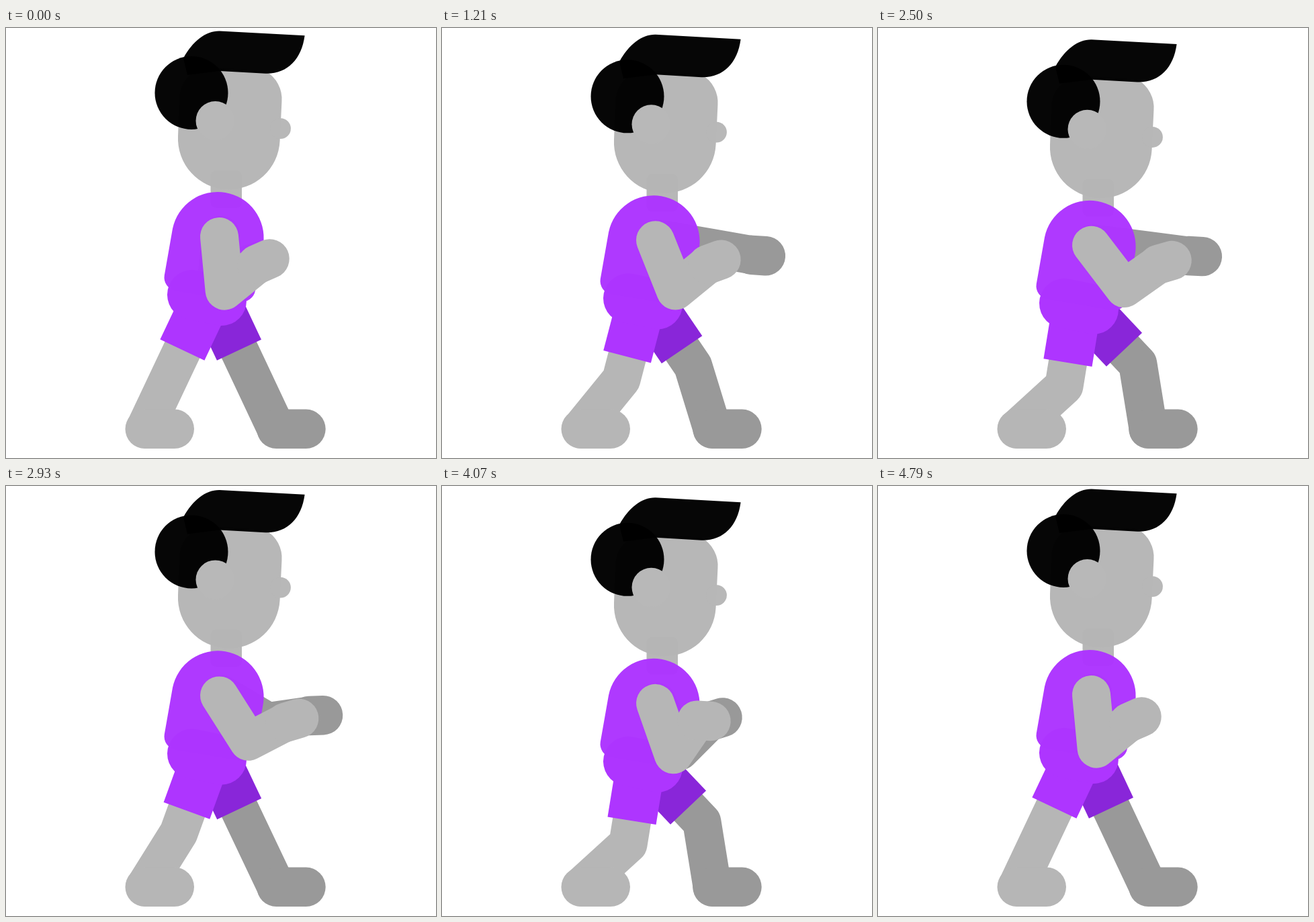
An HTML page with a canvas that plays this animation: 640x640 px, repeating every 4.87 s.

```html
<!DOCTYPE html>
<html lang="en">
<head>
<meta charset="utf-8">
<title>Boxer</title>
<style>
  html, body { margin: 0; height: 100%; overflow: hidden; background: #fff; }
  canvas { display: block; width: 100vmin; height: 100vmin; }
</style>
</head>
<body>
<canvas id="stage" width="640" height="640"></canvas>
<script>
const ctx = document.getElementById('stage').getContext('2d');
const LOOP = 4870, FPS = 14, LAST_STEP = 67;
const CYCLE = 4.8, BEATS = 6;
const SKIN = '#b6b6b6', SHADE = '#999999', HAIR = '#000';
const CLOTH = '#ae35ff', CLOTH_SHADE = '#8926d9';

// cubic-bezier(.8, 0, .2, 1)
function ease(u) {
  let lo = 0, hi = 1, s = 0.5;
  for (let i = 0; i < 24; i++) {
    s = (lo + hi) / 2;
    const x = 2.4 * s * (1 - s) ** 2 + 0.6 * s * s * (1 - s) + s ** 3;
    if (x < u) lo = s; else hi = s;
  }
  return s * s * (3 - 2 * s);
}

function smooth(from, to, x) {
  const u = Math.max(0, Math.min(1, (x - from) / (to - from)));
  return u * u * (3 - 2 * u);
}

// Rises from a to b, falls from c to d
const hump = (x, a, b, c, d) => smooth(a, b, x) - smooth(c, d, x);

function nearFist(p) {
  const reach = hump(p, 0, 0.5, 0.57, 0.95);
  const curl = hump(p, 0.62, 0.84, 0.86, 0.99);
  return [392.5 + 45 * reach, 343.5 + 2.5 * reach + 6 * curl, -24 + 8 * reach + 26 * curl];
}

// A long stretch forward, then a jab on each of the last two beats
function farFist(p) {
  const beat = p * BEATS;
  const jab = beat > 4 ? Math.sin(Math.PI * beat) ** 2 : 0;
  const reach = Math.max(hump(p, 0, 0.24, 0.465, 1.096), jab);
  return [382 + 104 * reach, 345 - 5 * reach ** 2, -20 + 24 * reach ** 2];
}

const polar = ([x, y], angle, r) => [x + r * Math.cos(angle), y + r * Math.sin(angle)];

// Two-bone chain: returns root, joint and end
function chain(root, target, a, b, bend) {
  const dx = target[0] - root[0], dy = target[1] - root[1];
  const d = Math.min(Math.hypot(dx, dy), a + b), base = Math.atan2(dy, dx);
  const cos = Math.min(1, (d * d + a * a - b * b) / (2 * d * a));
  return [root, polar(root, base + bend * Math.acos(cos), a), polar(root, base, d)];
}

function stroke(points, width, color, cap = 'round') {
  ctx.beginPath();
  points.forEach(p => ctx.lineTo(...p));
  ctx.lineWidth = width;
  ctx.strokeStyle = color;
  ctx.lineCap = cap;
  ctx.lineJoin = 'round';
  ctx.stroke();
}

function shape(path, color) {
  ctx.fillStyle = color;
  ctx.fill(path);
}

function disc(x, y, r, color) {
  const path = new Path2D();
  path.arc(x, y, r, 0, 7);
  shape(path, color);
}

function arm(shoulder, [x, y, degrees], color) {
  const angle = degrees * Math.PI / 180;
  const limb = chain(shoulder, polar([x, y], angle, -21), 81, 62, 1);
  stroke(limb, 57, color);
  stroke([limb[2], polar(limb[2], angle, 21)], 58.5, color);
}

function leg(hip, ankle, thigh, shin, color, cloth) {
  const limb = chain(hip, ankle, thigh, shin, -1);
  stroke(limb, 57.4, color);
  stroke([ankle, [ankle[0] + 44.1, ankle[1]]], 58.4, color);
  const angle = Math.atan2(limb[1][1] - hip[1], limb[1][0] - hip[0]);
  stroke([hip, polar(hip, angle, 75)], 73, cloth, 'butt');
}

const neck = new Path2D();
neck.roundRect(304.5, 212, 46.5, 56, 8);
const torso = new Path2D('M248 298.6A68.5 68.5 0 0 1 383 321.4L371 391A20 20 0 0 1 348 407L252 391A20 20 0 0 1 235.8 368Z');
const face = new Path2D('M258 108L256 161A75.8 75.8 0 0 0 407.6 168L410.4 110A48 48 0 0 0 386 64L300 58A48 48 0 0 0 258 108Z');
const quiff = new Path2D('M264 45C278 19 298 4 318 4.5L444.6 11.3C440 47 418 69 386 67.8L318 64L270 70Z');

// Slightly translucent, so overlaps show faintly
function upperBody() {
  ctx.globalAlpha = 0.975;
  shape(neck, SKIN);
  shape(torso, CLOTH);
  shape(face, SKIN);
  disc(408.5, 149.7, 15.4, SKIN);
  disc(276, 96.5, 54.5, HAIR);
  shape(quiff, HAIR);
  ctx.globalAlpha = 1;
  disc(311.5, 138, 29, '#b8b8b8');
}

function draw(seconds) {
  const p = seconds / CYCLE;
  const bounce = p * BEATS / 2 % 1;
  const drop = 12.9 * ease(1 - Math.abs(1 - 2 * bounce));
  ctx.fillStyle = '#fff';
  ctx.fillRect(0, 0, 640, 640);

  arm([320, 308 + drop], farFist(p), SHADE);
  leg([315, 411.4 + drop], [402.4, 596.8], 104.4, 98, SHADE, CLOTH_SHADE);
  leg([294.5, 411.4 + drop], [206.7, 596.8], 110, 95, SKIN, CLOTH);

  ctx.save();
  ctx.translate(0, drop);
  stroke([[277, 397], [321, 406]], 74, CLOTH);
  upperBody();
  ctx.restore();

  arm([317.5, 310.5 + drop], nearFist(p), SKIN);
}

function tick() {
  // Equal steps at a fixed rate; the small lead absorbs rounding to 10 ms
  const time = performance.now() % LOOP + 5;
  const step = Math.min(LAST_STEP, Math.floor(time * FPS / 1000));
  draw(step / FPS);
  requestAnimationFrame(tick);
}
tick();
</script>
</body>
</html>
```
